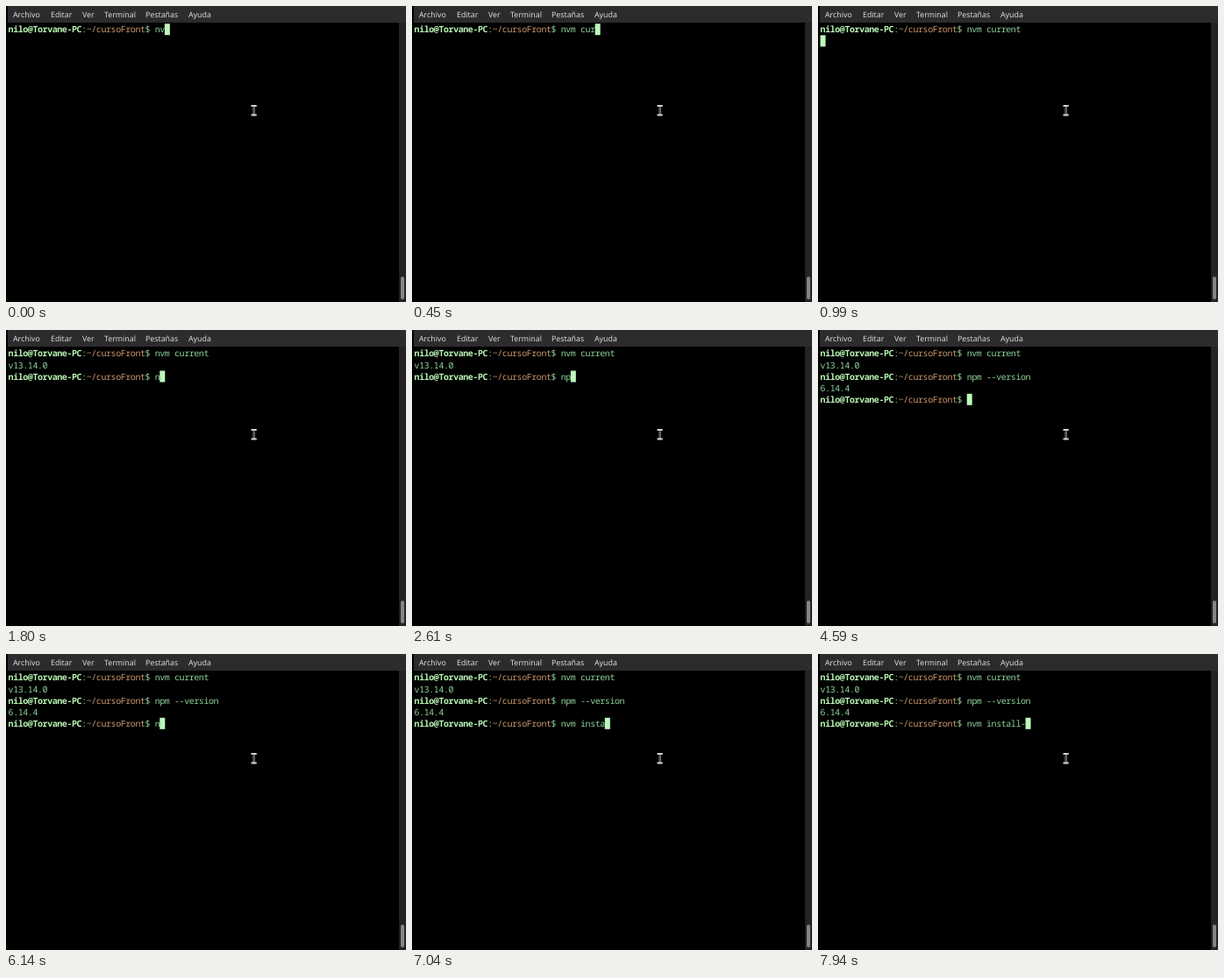
An HTML page for the animation above (8000 ms loop, 456x338 px).

```html
<!DOCTYPE html>
<html lang="es">
<head>
<meta charset="utf-8">
<title>Terminal</title>
<style>
  html, body { margin: 0; width: 100%; height: 100%; overflow: hidden; background: #000; }
  #stage { position: relative; width: 456px; height: 338px; overflow: hidden; background: #000; }
  #stage > * { position: absolute; }
  #menu { left: 2px; top: 0; width: 454px; height: 19px; background: #2d2b2e; }
  #menu span {
    position: absolute; top: 0; line-height: 20px; color: #dcdad8;
    font-family: "Noto Sans", "Open Sans", sans-serif; font-size: 8.8px;
    text-rendering: geometricPrecision;
  }
  #track { left: 448px; top: 19px; width: 8px; height: 319px; background: #232224; }
  #thumb { left: 450px; top: 309px; width: 4px; height: 26px; border-radius: 2px; background: #858487; }
  #screen {
    left: 2.6px; top: 20.4px; white-space: pre; color: #8ed39a;
    font-family: "Noto Sans Mono", "DejaVu Sans Mono", monospace;
    font-size: 10px; line-height: 13.15px; letter-spacing: calc(5.57px - 1ch);
    text-rendering: geometricPrecision; font-variant-ligatures: none;
  }
  #screen div { height: 13.15px; }
  .user { color: #b9f6b3; font-weight: 700; }
  .path { color: #cb986d; }
  #caret { left: 0; top: 0; width: 5.6px; height: 13px; background: #bdf7bb; }
  #pointer { left: 278px; top: 112px; }
</style>
</head>
<body>
<div id="stage">
  <div id="menu"></div>
  <div id="track"></div>
  <div id="thumb"></div>
  <div id="caret"></div>
  <div id="screen"></div>
  <svg id="pointer" width="10" height="15" fill="none">
    <path d="M1.5 2h2.2l.9 .8 .9-.8h2.2M1.5 12.5h2.2l.9-.8 .9 .8h2.2M4.6 2.8v9" stroke="#d5d5d5" stroke-width="1.9"/>
    <path d="M4.6 3.4v7.8" stroke="#000" stroke-width=".7"/>
  </svg>
</div>
<script>
const LOOP = 8000, CELL = 5.57, ROW = 13.15, LEFT = 2.6, TOP = 20.2;
const USER = "nilo@Torvane-PC", PATH = "~/cursoFront";
const PROMPT_LEN = USER.length + PATH.length + 3;
const PROMPT = `<span class="user">${USER}</span>:<span class="path">${PATH}</span>$ `;
const $ = id => document.getElementById(id);

[["Archivo", 8], ["Editar", 51], ["Ver", 87], ["Terminal", 112], ["Pestañas", 159], ["Ayuda", 208]]
  .forEach(([label, x]) => {
    const item = document.createElement("span");
    item.textContent = label;
    item.style.left = x - 2 + "px";
    $("menu").append(item);
  });

// finished lines; even rows carry a prompt
const lines = ["nvm current", "v13.14.0", "npm --version", "6.14.4"];
const withPrompt = (row, text) => (row % 2 ? "" : PROMPT) + text;

// [start ms, row, typed text]; null means the prompt is not there yet
const steps = [];
const typeOut = (row, text, from, times) =>
  times.forEach((t, i) => steps.push([t, row, text.slice(0, from + i)]));

typeOut(0, lines[0], 2, Array.from({ length: 10 }, (_, i) => i * 90));
steps.push([990, 1, null], [1080, 2, null], [1170, 2, ""]);
typeOut(2, "nvm", 1, [1710, 1890, 2070]);
steps.push([2250, 2, "nv"], [2430, 2, "n"]);
typeOut(2, lines[2], 2, [2610, 2880, 2970, 3240, 3330, 3420]);
steps.push([3510, 2, "npm --ver"], [3690, 2, "npm --versi"], [3780, 2, lines[2]]);
steps.push([4050, 3, null], [4230, 4, ""]);
typeOut(4, "nvm install-", 1,
  [6140, 6230, 6320, 6410, 6590, 6680, 6860, 6950, 7040, 7130, 7490, 7940]);

let shown = -1;
function render(t) {
  let i = steps.length - 1;
  while (steps[i][0] > t) i--;
  if (i === shown) return;
  shown = i;
  const [, row, text] = steps[i];
  const rows = lines.slice(0, row).map((line, r) => withPrompt(r, line));
  if (text !== null) rows.push(withPrompt(row, text));
  $("screen").innerHTML = rows.map(r => `<div>${r}</div>`).join("");
  const col = text === null ? 0 : PROMPT_LEN + text.length;
  $("caret").style.transform = `translate(${LEFT + col * CELL}px, ${TOP + row * ROW}px)`;
}

const start = performance.now();
function tick() {
  render((performance.now() - start) % LOOP);
  requestAnimationFrame(tick);
}
tick();
</script>
</body>
</html>
```
